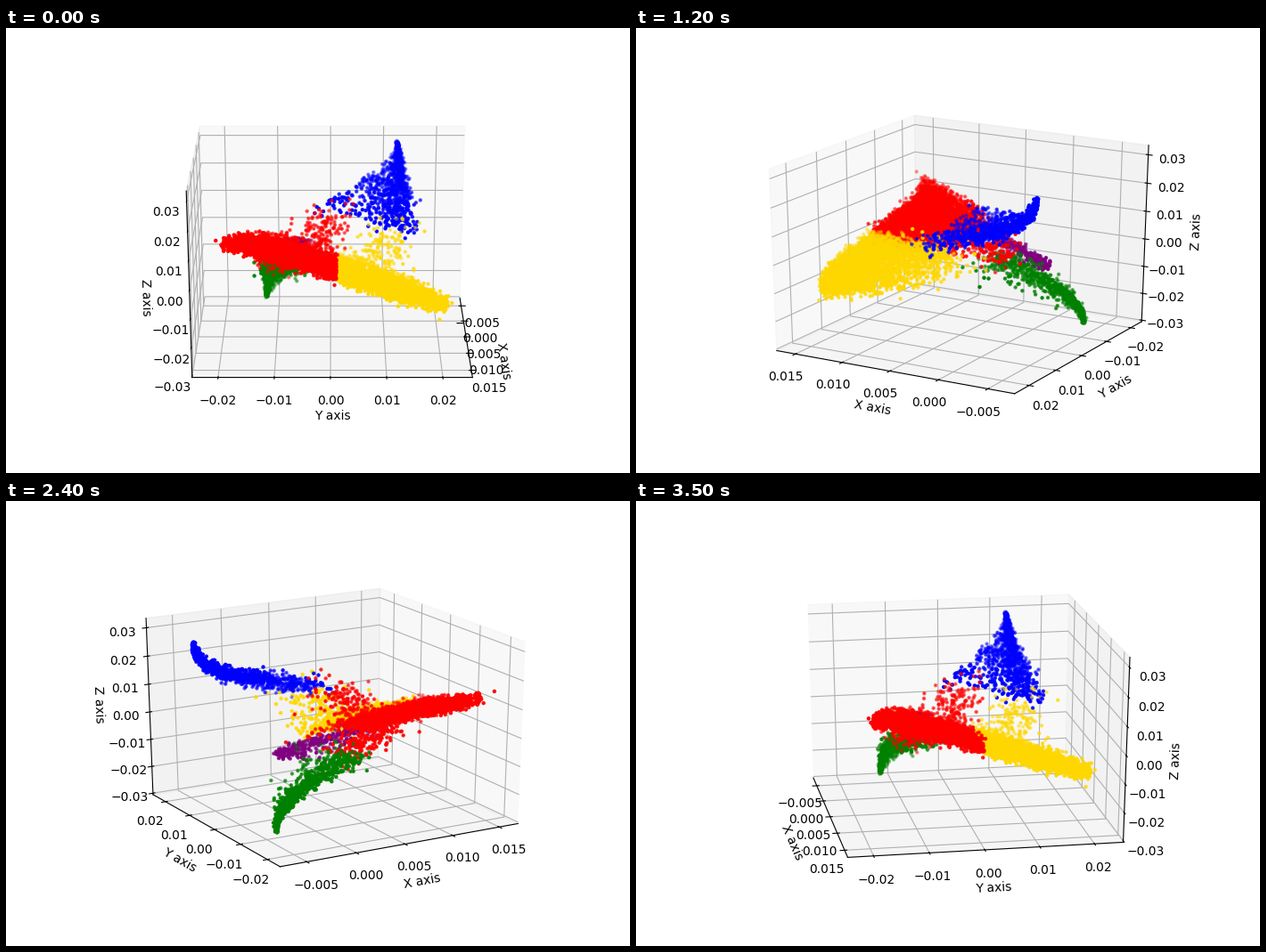
A matplotlib script for the animation above (3.6 s loop, 700 by 500 pixels).

```python
import numpy as np
import matplotlib.pyplot as plt
from matplotlib.animation import FuncAnimation
from mpl_toolkits.mplot3d import Axes3D

FRAMES = 36
ELEV = 22
MID = np.array([0.00469, 0.00033, 0.0014])   # centre of the data cube
SPAN = np.array([0.0237, 0.0479, 0.0613])    # its width on each axis

rng = np.random.default_rng(4)


class WideAxes3D(Axes3D):
    """3D axes that fill their whole rectangle instead of a square."""

    def apply_aspect(self, position=None):
        pass


def jitter(sd):
    return sd * rng.normal(size=np.size(sd))


# Each cluster returns x, y, z in cube units, from -0.5 to 0.5.

def sheet(n, side):
    """Half of the sloping triangular sheet, on one side of y = 0."""
    depth = np.abs(rng.normal(0, 0.155, n))
    reach = np.clip(0.42 - 0.45 * depth, 0.1, None)
    y = 0.015 + side * np.abs(reach * rng.uniform(0, 1, n) + rng.normal(0, 0.012, n))
    x = 0.4 + 0.14 * y - 7 * y**5 - depth + rng.normal(0, 0.012, n)
    z = -0.03 + 0.1 * x - 0.44 * y + rng.normal(0, 0.02, n)
    return x, y, z


def streak(n, start, end, spread):
    """A fuzzy straight trail of points."""
    u = rng.uniform(0, 1, (n, 1))
    pts = np.array(start) * (1 - u) + np.array(end) * u
    return (pts + rng.normal(0, spread, (n, 3))).T


def red():
    neck = streak(230, (0.2, -0.2, 0.05), (-0.07, -0.2, -0.1), 0.035)
    rise = streak(170, (0.1, -0.08, 0.02), (0.0, -0.02, 0.18), 0.05)
    rise[1] = np.minimum(rise[1], 0.08)
    return np.hstack([sheet(3400, -1), neck, rise])


def yellow():
    loose = streak(150, (0.1, 0.16, -0.08), (-0.03, 0.22, 0.09), 0.06)
    loose[1] = np.maximum(loose[1], 0.03)
    return np.hstack([sheet(3000, 1), loose])


def blue():
    """Sharp tip that drops fast, then opens into a fan."""
    s = 1.03 * rng.uniform(0, 1, 1100) ** 0.9
    u = s**2.5
    fan = 0.33 * u**0.8 * np.minimum(rng.exponential(0.4, s.size), 1)
    x = -0.46 + 0.4 * u + np.abs(jitter(0.004 + 0.03 * s))
    y = 0.253 + 0.05 * s - fan + jitter(0.002 + 0.016 * s)
    z = 0.449 - 0.33 * s + 0.32 * fan + jitter(0.004 + 0.022 * s)
    return x, y, z


def green():
    """Tail that climbs from a low tip and bends towards the centre."""
    s = rng.uniform(0, 1, 800) ** 1.2
    x = -0.394 + 0.374 * s**1.6 + jitter(0.003 + 0.022 * s)
    y = -0.265 + s * rng.exponential(0.07, s.size) + jitter(0.003 + 0.018 * s)
    z = -0.455 + 0.345 * s**0.75 + jitter(0.003 + 0.02 * s)
    return x, y, z


def purple():
    """Thin ridge with loose points hanging below it."""
    u = rng.uniform(0, 1, 380)
    hang = rng.uniform(-1.5, 1, u.size).clip(0) * np.sin(np.pi * u)
    x = -0.31 + 0.42 * u + jitter(0.01 + 0.02 * hang)
    y = -0.12 - 0.115 * u + jitter(0.02 + 0.03 * hang)
    z = -0.09 + 0.155 * u**0.8 - 0.12 * hang + jitter(0.008 + 0 * u)
    return x, y, z


fig = plt.figure(figsize=(7, 5), dpi=100, facecolor="white")
ax = fig.add_axes(WideAxes3D(fig, [0.125, 0.11, 0.775, 0.77]))
ax.set_box_aspect((1, 1, 1), zoom=np.sqrt(3) / 1.8294640721620434)

clusters = {"red": red, "gold": yellow, "blue": blue,
            "green": green, "purple": purple}
for color, make in clusters.items():
    pts = MID + SPAN * np.transpose(make())
    ax.scatter(*pts.T, s=3, c=color, linewidths=1.5)

half = SPAN * 25 / 48
for k, (name, step) in enumerate(zip("xyz", (0.005, 0.01, 0.01))):
    lo, hi = MID[k] - half[k], MID[k] + half[k]
    ticks = step * np.arange(np.ceil(lo / step), np.floor(hi / step) + 1)
    ax.set(**{f"{name}label": f"{name.upper()} axis",
              f"{name}ticks": ticks, f"{name}lim": (lo, hi)})


def update(i):
    azim = i * 360 / FRAMES
    a = np.radians(azim)
    # a tiny nudge decides which walls show in edge-on views
    ax.view_init(elev=ELEV, azim=azim + 0.01 * np.sign(np.cos(a) - np.sin(a)))
    return ()


anim = FuncAnimation(fig, update, frames=FRAMES, interval=100, repeat=True)
plt.show()
```
